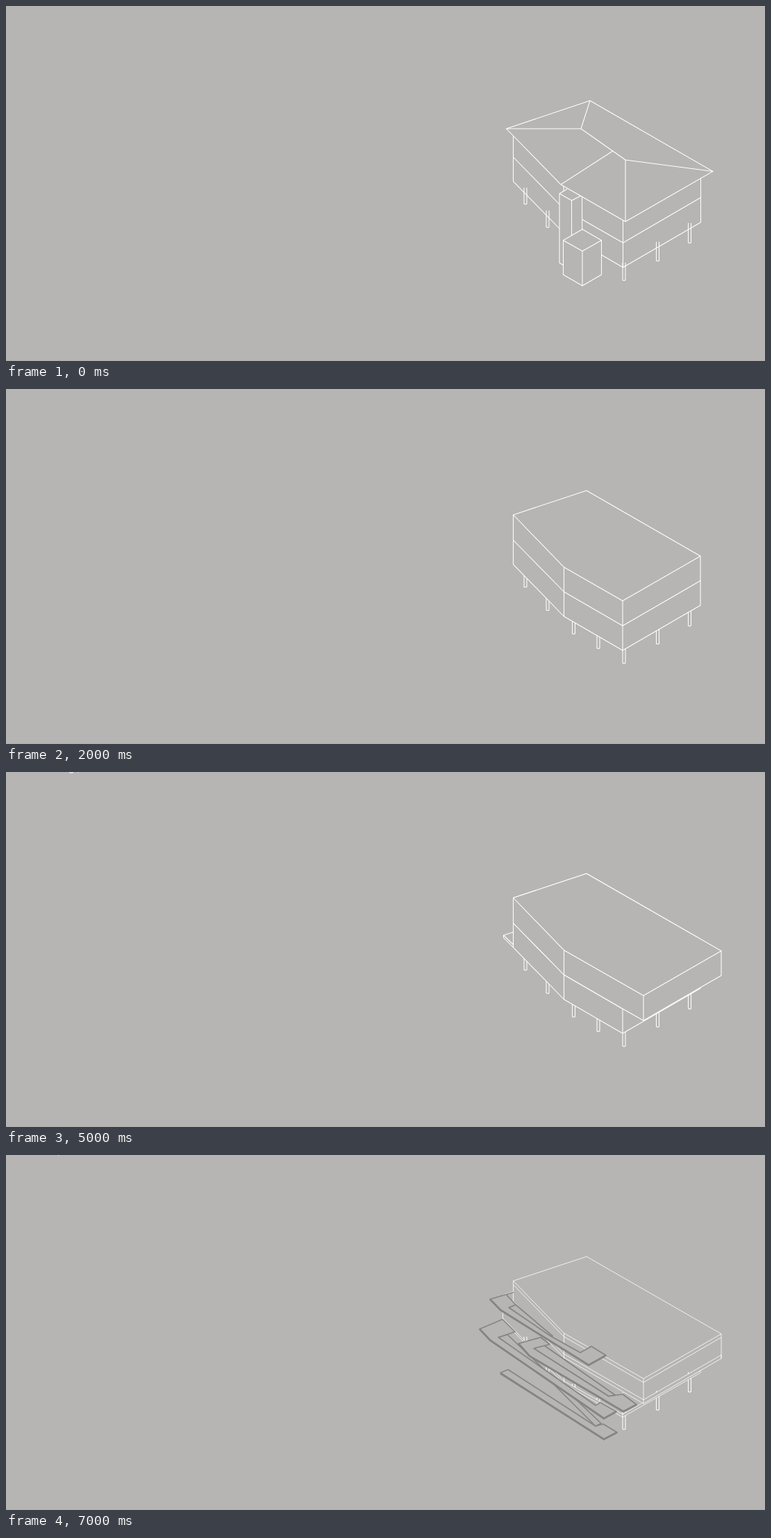
Recreate the animation shown at these times as an HTML page. Size 1093 by 512 pixels, loop 8000 ms.

```html
<!DOCTYPE html>
<html>
<head>
<meta charset="utf-8">
<style>
html, body { margin: 0; width: 100%; height: 100%; overflow: hidden; background: #b7b5b3; }
svg { display: block; width: 1093px; height: 512px; }
path, ellipse { fill: none; stroke: #fff; stroke-width: 1.05; stroke-linejoin: round; }
.face { fill: #b7b5b3; }
.removed path { stroke-dasharray: 4 3; fill: none; }
path.drop { stroke-dasharray: 6 4; }
path.trace { stroke-dasharray: 2.5 2.5; stroke-width: .6; }
.thin path { stroke-width: .8; }
.ramp path { stroke: #868583; stroke-width: 1.7; fill: #b7b5b3; }
.ramp path.edge { stroke-width: 2.8; fill: none; }
</style>
</head>
<body>
<svg viewBox="0 0 1093 512"></svg>
<script>
const STEP = 1000, STEPS = 8;
const svg = document.querySelector('svg');

const line = (d, cls = '') => `<path class="${cls}" d="${d}"/>`;
const face = d => line(d, 'face');
const edge = d => line(d, 'edge');
const post = (x, top, bottom) => line(`M${x - 2} ${top}V${bottom - .8}q2 1.3 4 0V${top}`);
const posts = list => list.map(p => post(...p)).join('');
const group = (steps, content, cls = '') => `<g data-steps="${steps}" class="${cls}">${content}</g>`;

const outerPosts = posts([[748, 262, 286], [780, 295, 319.5], [890, 370, 396],
  [938.5, 340, 368], [984.5, 313, 342]]);
const frontPosts = posts([[817.5, 330, 353.5], [853, 350, 374.5]]);

const hull = face('M730.5 181.5L836 146.5 1000 241V312L888 377 803.5 328 730.5 253Z') +
  line('M803.5 257V328M888 341.5V377M730.5 181.5L803.5 257 888 305.5M730.5 218L803.5 292.5 888 341.5');
const hullSide = line('M888 305.5V341.5M888 305.5L1000 241M888 341.5L1000 276.5');

const houseWalls = line('M730.5 187V253L797 321M730.5 218L797 286M888.5 309V377L1000.5 312V248M829 307.5L888.5 341.5 1000 276.5M857.5 359L888.5 377');
const tower = face('M803 260V267L797 270.5V370.5L830 390 829.5 273 814.5 280.5 797 270.5 808 264') +
  line('M814.5 280.5V331');
const roof = face('M720.5 177L841 136.5 1018 238.5 892 311 799 257.5Z') +
  line('M720.5 177H828L841 136.5M828 177L892 222 1018 238.5M892 222V311M799 257.5L874 209');
const cube = face('M802.5 338L830 322 857.5 338V387.5L830 403.5 802.5 387.5Z') +
  line('M802.5 338L830 353.5 857.5 338M830 353.5V403.5');

const holes = [[748, 185], [790, 171], [837, 155.5], [780, 218.5], [827.5, 203.5],
  [873.5, 177], [817.5, 253], [865.5, 225], [910.5, 198], [853, 274], [901.5, 246],
  [947.5, 219.5], [890, 295], [938.5, 267], [984.5, 240.5]]
  .map(([x, y]) => `<ellipse cx="${x}" cy="${y}" rx="2.1" ry="1.5"/>`).join('');

const liftedParts =
  line('M716 48.5L841 6.5 901 41 879.5 53 836 28.5 730 63ZV51.5L730 66 836 32 879.5 56.5 901 44V41M730 63V66M836 28.5V32M879.5 53V56.5') +
  line('M888 120L1000 55.5 1029.5 72 917.5 137ZV155.5L917.5 172.5 1029.5 107.5V72M917.5 137V172.5') +
  line('M716.5 52V236M730 66V250M836 32V146M879.5 57V170M888 156V305M917.5 173V358M1029.5 108V258', 'drop') +
  line('M730 231L716 236 730 250M1000 241L1029.5 258 917.5 323 888 306M1029.5 258V293.5L917.5 358 888 341M1000 276.5L1029.5 293.5', 'trace') +
  '<rect width="2" height="512" fill="#fff"/>';

const ledge = line('M730.5 231L716.5 235.5V239L730.5 253M716.5 235.5L730.5 249');
const extension = face('M888 341.5V305.5L1000 241 1030 258V293.5L918 358.5Z') +
  line('M918 322.5V358.5M918 322.5L1030 258M888 305.5L918 322.5');
const merged = face('M730.5 181.5L836 146.5 1030 258V293.5L918 358.5 888 341.5 803.5 292.5 730.5 218Z') +
  line('M730.5 181.5L803.5 257 918 322.5 1030 258M918 322.5V358.5M803.5 257V292.5');

const innerPosts = posts([[748, 200, 216.5], [780, 234, 250], [817.5, 266, 284.5], [853, 287, 305.5], [890, 308, 326.5],
  [748, 232, 256], [780, 264, 289.5], [817.5, 297, 324], [853, 318, 345], [890, 338, 366]]);
const slabs =
  face('M715.5 235.5L803.5 326 888 374 916 358 1000 310.5V314L888 378 803.5 330 715.5 238.5Z') +
  face('M730.5 211L803.5 287 918 353 1030 288.5V293.5L918 358.5 803.5 292 715.5 202') +
  face('M730.5 181.5L836 146.5 1030 258V263L918 328 803.5 262 730.5 187Z') +
  line('M730.5 181.5L803.5 257 918 322.5 1030 258') +
  line('M730.5 187V216M715.5 202V238.5M715.5 202L730.5 197M803.5 257V330M888 342V378M918 322.5V358.5M1030 263V293.5');
const floors = line('M730.5 211L747 206.5M715.5 236L742 227.5M1030 288.5L1008 276');

const ramps =
  face('M712 314L723 309.5 849 391 860 388 880 400 861 410Z') + edge('M712 315L861 410 880 400') +
  face('M709 263L722 259 857 387 849 391 770 312Z') +
  face('M682 251L715 237 733 255 709 263 849 361 856 357 879 370 861 380 697 267Z') +
  edge('M682 251L697 267 861 380 879 370') +
  face('M760 279L774 274 877 346 868 348Z') +
  face('M738 272L770 263 783 273 760 279 868 348 888 345 908 360 889 370 754 290Z') +
  edge('M738 272L754 290 889 370 908 360') +
  face('M724 220L734 216 787 261 784 262Z') +
  face('M731 198L697 208 712 223.5 839 303 864 289 843 276 827 285 784 261 724 220 734 216 721 202') +
  edge('M697 208L712 223.5 839 303 864 289');

svg.innerHTML =
  group('0134567' + '2', '<rect y="511" width="1093" height="1" fill="#b0aeac"/>') +
  group('01234567', outerPosts) +
  group('1234567', frontPosts) +
  group('0', houseWalls + tower + roof + cube) +
  group('12345', hull) +
  group('1234', hullSide) +
  group('1', tower + roof + cube, 'removed') +
  group('3', holes + liftedParts) +
  group('45', ledge) +
  group('4', extension + holes) +
  group('5', merged) +
  group('6', floors + innerPosts + slabs) +
  group('7', slabs, 'thin') +
  group('7', ramps, 'ramp') +
  group('45', line('M91 0q3 2.6 6 0')) +
  group('5', line('M104 0v1')) +
  group('6', line('M82.5 0v1M126.5 0v1')) +
  group('7', line('M75.5 0v1'));

const groups = [...svg.children];
function draw(now) {
  const step = Math.floor(now / STEP) % STEPS;
  for (const g of groups) g.style.display = g.dataset.steps.includes(step) ? '' : 'none';
  requestAnimationFrame(draw);
}
draw(performance.now());
</script>
</body>
</html>
```
